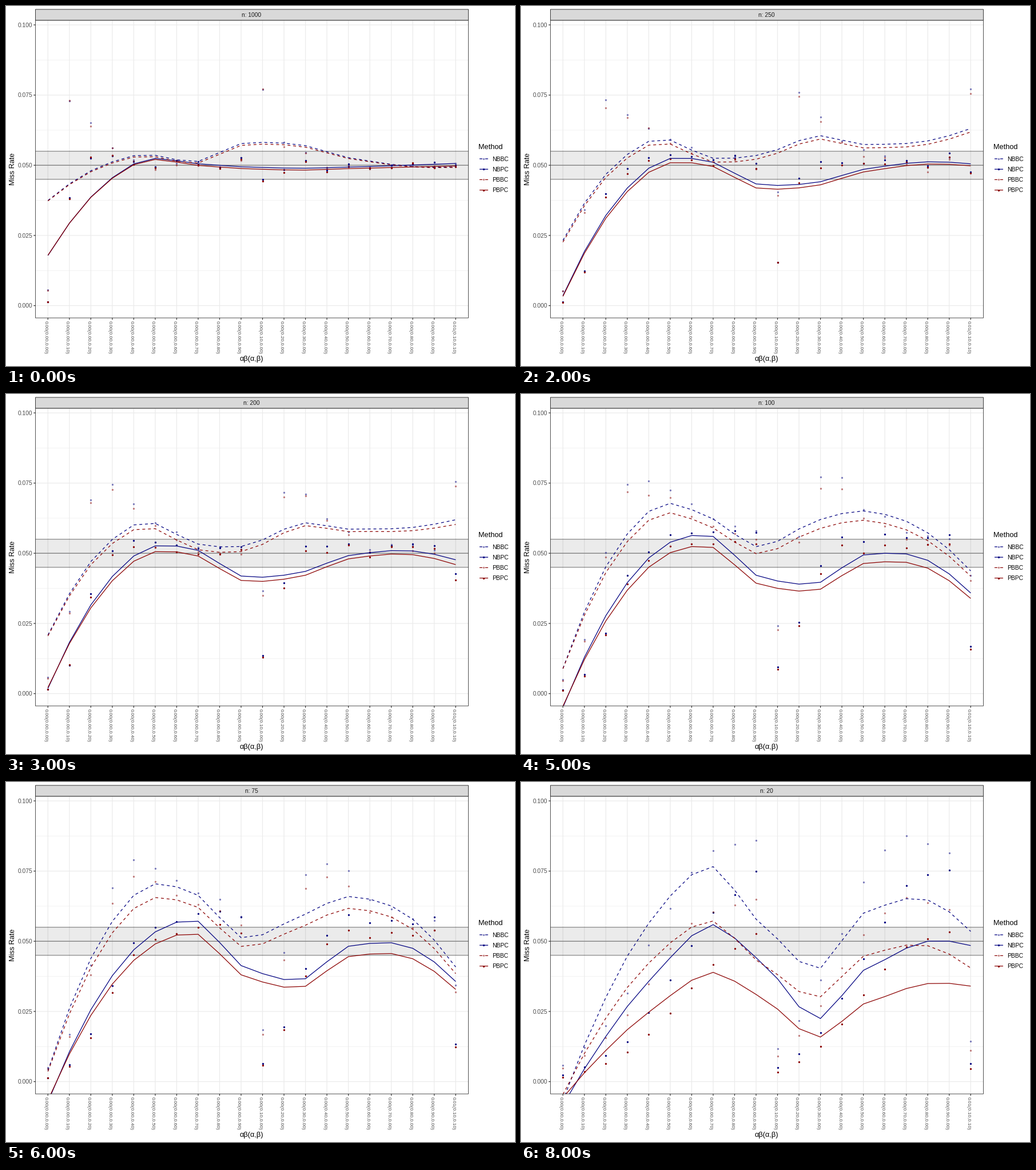
A matplotlib script that plays this animation: 890x629 px, repeating every 9000 ms.

```python
import numpy as np
import matplotlib.pyplot as plt
from matplotlib.animation import FuncAnimation
from matplotlib.patches import Rectangle

W, H, DPI = 890, 629, 100
PX = 72 / DPI  # points per pixel
LEFT, RIGHT, TOP, BOTTOM = 51.5, 808.5, 24.9, 545
NAVY, RED = "#000080", "#8B0000"
GREY20, GREY30 = "#333333", "#4D4D4D"
METHODS = {  # colour, line style, point opacity
    "NBBC": (NAVY, (0, (4, 4)), 0.5),
    "NBPC": (NAVY, "-", 1),
    "PBBC": (RED, (0, (4, 4)), 0.5),
    "PBPC": (RED, "-", 1),
}
SIZES = [1000, 500, 250, 200, 150, 100, 75, 50, 20]

# effect pairs: beta alone, then alpha alone, then both
X = np.arange(20)
ALPHA = np.where(X < 10, 0, (X - 9) / 10)
BETA = np.where(X < 10, X / 10, 0)
ALPHA[-1] = BETA[-1] = 0.1

plt.rcParams["font.family"] = "Liberation Sans"


def logistic(t):
    return 1 / (1 + np.exp(-t))


def miss_rates(n):
    """Simulated miss rates for one sample size, one row per method."""
    rng = np.random.default_rng(n)
    z = np.sqrt(n) * np.hypot(1.08 * ALPHA, 0.96 * BETA) * (1 + n * ALPHA * BETA / 4)
    corrected = (0.05 + 0.1166 * np.exp(-z / 2.7)) * logistic(1.65 * (z - 2.05))
    plain = 0.05 * logistic(1.55 * (z - 2.25))
    nbbc, nbpc = corrected * (1 + 3 / n), plain * (1 + 12 / n)
    rows = np.array([nbbc, nbpc, nbbc * (1 - 5 / n), nbpc * (1 - 6 / n)])
    noise = rng.normal(0, 0.006, 20) + rng.normal(0, 0.002, rows.shape)
    return np.round((rows + noise * np.sqrt(rows)) * 5000) / 5000


def loess(y, near=15):
    """Local quadratic fit at the cell corners, joined by cubic Hermite pieces."""
    knots = np.array([-0.095, 2, 4, 7, 9, 12, 14, 17, 19.095])
    value, slope = [], []
    for k in knots:
        d = np.abs(X - k)
        weight = np.clip(1 - (d / np.sort(d)[near - 1]) ** 3, 0, 1) ** 3
        _, b, a = np.polyfit(X - k, y, 2, w=weight ** 0.5)
        value.append(a)
        slope.append(b)
    value, slope = np.array(value), np.array(slope)
    i = np.searchsorted(knots, X) - 1
    h = knots[i + 1] - knots[i]
    t = (X - knots[i]) / h
    return ((1 + 2 * t) * (1 - t) ** 2 * value[i] + t * (1 - t) ** 2 * h * slope[i]
            + t * t * (3 - 2 * t) * value[i + 1] + t * t * (t - 1) * h * slope[i + 1])


def px(i):
    return 73.3 + 713 / 19 * i


def py(rate):
    return 523.5 - 4905 * rate


fig = plt.figure(figsize=(W / DPI, H / DPI), dpi=DPI, facecolor="white")
ax = fig.add_axes([0, 0, 1, 1])
ax.set_xlim(0, W)
ax.set_ylim(H, 0)
ax.axis("off")


def line(xs, ys, color, width, z, **kw):
    return ax.plot(xs, ys, color=color, lw=width * PX, zorder=z, snap=False,
                   solid_capstyle="butt", dash_capstyle="butt", **kw)[0]


def box(y0, y1, z, **kw):
    return ax.add_patch(Rectangle((LEFT, y0), RIGHT - LEFT, y1 - y0,
                                  zorder=z, snap=False, **kw))


def label(x, y, s, size, color="black", **kw):
    return ax.text(x, y, s, size=size * PX, color=color, va="baseline",
                   rotation_mode="anchor", **kw)


def dots(xs, ys, color, alpha, z):
    return ax.plot(xs, ys, "o", color=color, alpha=alpha, ms=3.3 * PX, mew=0, zorder=z)[0]


# grid and axes
for rate in np.arange(0.0125, 0.1, 0.025):
    line([LEFT, RIGHT], [py(rate)] * 2, "#EBEBEB", 0.62, 1)
for rate in np.linspace(0, 0.1, 5):
    y = py(rate)
    line([LEFT, RIGHT], [y, y], "#EBEBEB", 1.24, 1)
    line([LEFT - 3.2, LEFT], [y, y], GREY20, 1.24, 1)
    label(46, y + 3.7, f"{rate:.3f}", 10.2, GREY30, ha="right")
for x, a, b in zip(px(X), ALPHA, BETA):
    line([x, x], [TOP, BOTTOM], "#EBEBEB", 1.24, 1)
    line([x, x], [BOTTOM, BOTTOM + 3.2], GREY20, 1.24, 1)
    label(x - 6, 550, f"{a * b:.2f}({a:.2f},{b:.2f})", 8.5, GREY30,
          rotation=270, ha="left")

# accepted range
box(py(0.055), py(0.045), 2, fc="black", alpha=0.08, lw=0)
for rate in (0.045, 0.05, 0.055):
    line([LEFT, RIGHT], [py(rate)] * 2, "black", 1.24, 2, alpha=0.45)

# frame, strip and titles
frame = box(TOP, BOTTOM, 6, fc="none", ec=GREY20, lw=0.85 * PX)
box(5.9, TOP, 6, fc="#D9D9D9", ec=GREY20, lw=0.95 * PX)
strip = label(429.5, 19.2, "", 10.2, "#1A1A1A", ha="center", zorder=7)
label(429.5, 620, "αβ(α,β)", 12.75, ha="center")
label(15.5, 285, "Miss Rate", 12.75, rotation=90, ha="center")

# legend and data artists
label(826, 250, "Method", 12.75, ha="left")
points, curves = [], []
for k, (name, (color, style, alpha)) in enumerate(METHODS.items()):
    y = 267 + 18.2 * k
    dots([835.4], [y], color, alpha, 3)
    line([828, 843], [y, y], color, 1.24, 4, ls=style)
    label(850.5, y + 3.7, name, 10.2, ha="left")
    points.append(dots([], [], color, alpha, 3))
    curve = line([], [], color, 1.24, 4, ls=style)
    curve.set_clip_path(frame)
    curves.append(curve)


def update(step):
    n = SIZES[step]
    strip.set_text(f"n: {n}")
    for dot, curve, row in zip(points, curves, miss_rates(n)):
        dot.set_data(px(X), py(row))
        curve.set_data(px(X), py(loess(row)))
    return [strip, *points, *curves]


anim = FuncAnimation(fig, update, frames=len(SIZES), interval=1000,
                     repeat=True, repeat_delay=0, blit=False)
plt.show()
```
